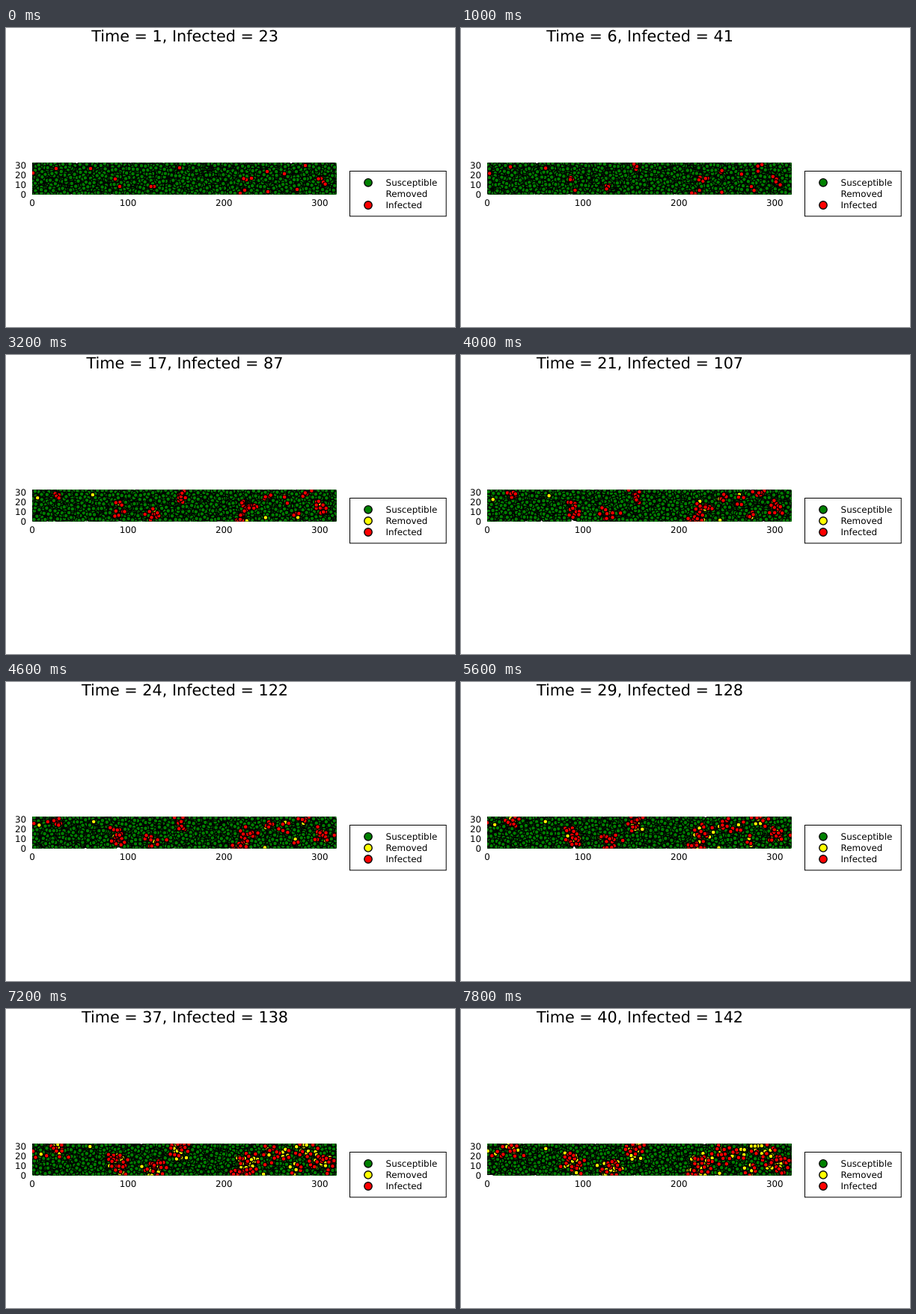
An HTML page with a canvas for the animation above (8 s loop, 600 by 400 pixels).

```html
<!DOCTYPE html>
<html lang="en">
<head>
<meta charset="utf-8">
<title>Epidemic in a strip</title>
<style>
html, body { margin: 0; width: 100%; height: 100%; overflow: hidden; background: #fff; }
canvas { display: block; }
</style>
</head>
<body>
<canvas id="stage" width="600" height="400"></canvas>
<script>
const ctx = document.getElementById('stage').getContext('2d');
const STEPS = 40, STEP_MS = 200, PEOPLE = 5000;
const LEFT = 35, TOP = 180.3, WIDTH = 406.5, HEIGHT = 42.2, UNIT = 1.281;
const COLOURS = { Susceptible: '#008000', Removed: '#ffff00', Infected: '#ff0000' };

// Counts over time: [time, value], linear in between
const INFECTED = [[1, 23], [6, 41], [13, 65], [17, 87], [24, 122], [33, 132], [40, 142]];
const REMOVED = [[1, 0], [10, 0], [17, 15], [24, 34], [33, 85], [40, 160]];

// First cases in order of recovery: x, y, how strongly they spread
const FIRST = [
  [113, 188, 0], [350, 219, 0], [389, 216, 6], [420, 201, 13], [36, 194, 1], [424, 206, 9],
  [152, 212, 7], [328, 201, 7], [198, 212, 12], [372, 195, 2], [232, 187, 13], [146, 202, 9],
  [319, 217, 8], [400, 184, 9], [321, 203, 6], [67, 188, 7], [313, 221, 4], [349, 192, 12]
];
const STRENGTH = FIRST.reduce((sum, f) => sum + f[2], 0);

let seed = 20417;
function random() {
  seed = (seed + 0x6D2B79F5) | 0;
  let a = Math.imul(seed ^ (seed >>> 15), 1 | seed);
  a = (a + Math.imul(a ^ (a >>> 7), 61 | a)) ^ a;
  return ((a ^ (a >>> 14)) >>> 0) / 4294967296;
}
const normal = () => (random() + random() + random() + random() - 2) * 1.732;

function count(curve, time) {
  const i = Math.max(1, curve.findIndex(p => p[0] >= time));
  const [t0, v0] = curve[i - 1], [t1, v1] = curve[i];
  return Math.round(v0 + (v1 - v0) * (time - t0) / (t1 - t0));
}
const everIll = time => count(INFECTED, time) + count(REMOVED, time);

// Mirror a position back into the strip
function fold(v, low, size) {
  const m = (((v - low) % (2 * size)) + 2 * size) % (2 * size);
  return low + (m > size ? 2 * size - m : m);
}

// Random walk that passes through (x, y) at the given time
function walk(x, y, time, stride) {
  const path = [[0, 0]];
  for (let t = 1; t < STEPS; t++) {
    const [px, py] = path[t - 1];
    path.push([px + normal() * stride, py + normal() * stride]);
  }
  const [ox, oy] = path[time - 1];
  return path.map(([px, py]) => [
    fold(x + px - ox, LEFT, WIDTH),
    fold(y + py - oy, TOP, HEIGHT)
  ]);
}

// Later cases appear around a first case, further out as time goes on
function laterCase(index) {
  let time = 1;
  while (everIll(time) <= index) time++;
  let pick = random() * STRENGTH;
  const [x, y] = FIRST.find(f => (pick -= f[2]) < 0);
  const spread = 2 + 7 * time / STEPS;
  return walk(x + normal() * spread, y + normal() * spread * 0.75, time, 0.8);
}

const cases = everIll(STEPS);
const people = Array.from({ length: PEOPLE }, (_, i) => {
  if (i < FIRST.length) return walk(FIRST[i][0], FIRST[i][1], 1, 0.8);
  if (i < cases) return laterCase(i);
  return walk(LEFT + random() * WIDTH, TOP + random() * HEIGHT, 1, 1.2);
});

function dot(x, y, r, line, colour) {
  ctx.beginPath();
  ctx.arc(x, y, r, 0, 2 * Math.PI);
  ctx.fillStyle = colour;
  ctx.fill();
  ctx.lineWidth = line;
  ctx.stroke();
}

function label(text, x, y, align, size = 11.87) {
  ctx.font = size + 'px "DejaVu Sans", sans-serif';
  ctx.textRendering = 'geometricPrecision';
  ctx.textAlign = align;
  ctx.fillStyle = '#000';
  ctx.fillText(text, x, y);
}

function drawPeople(from, to, time, colour) {
  for (let i = from; i < to; i++) {
    const [x, y] = people[i][time - 1];
    dot(x, y, 2.8, 1.15, colour);
  }
}

function drawLegend(removed) {
  ctx.lineWidth = 1;
  ctx.strokeRect(459.5, 191.5, 128.7, 60.3);
  Object.keys(COLOURS).forEach((name, i) => {
    const y = 206.8 + 15.1 * i;
    if (name !== 'Removed' || removed) dot(484, y, 5.2, 1.4, COLOURS[name]);
    label(name, 507.6, y + 4.4, 'left');
  });
}

function draw(time) {
  const removed = count(REMOVED, time), infected = count(INFECTED, time);
  const ill = removed + infected;
  ctx.fillStyle = '#fff';
  ctx.fillRect(0, 0, 600, 400);
  ctx.strokeStyle = '#000';

  ctx.save();
  ctx.beginPath();
  ctx.rect(LEFT, TOP, WIDTH, HEIGHT);
  ctx.clip();
  drawPeople(ill, PEOPLE, time, COLOURS.Susceptible);
  drawPeople(0, removed, time, COLOURS.Removed);
  drawPeople(removed, ill, time, COLOURS.Infected);
  ctx.restore();

  label(`Time = ${time}, Infected = ${infected}`, 239, 18, 'center', 20.77);
  for (let v = 0; v <= 300; v += 100) label(v, LEFT + v * UNIT, 237.8, 'center');
  for (let v = 0; v <= 30; v += 10) label(v, 27.1, 226.8 - v * UNIT, 'right');
  drawLegend(removed > 0);
}

let shown = 0;
function frame() {
  const time = Math.floor(performance.now() / STEP_MS) % STEPS + 1;
  if (time !== shown) draw(shown = time);
  requestAnimationFrame(frame);
}
frame();
</script>
</body>
</html>
```
